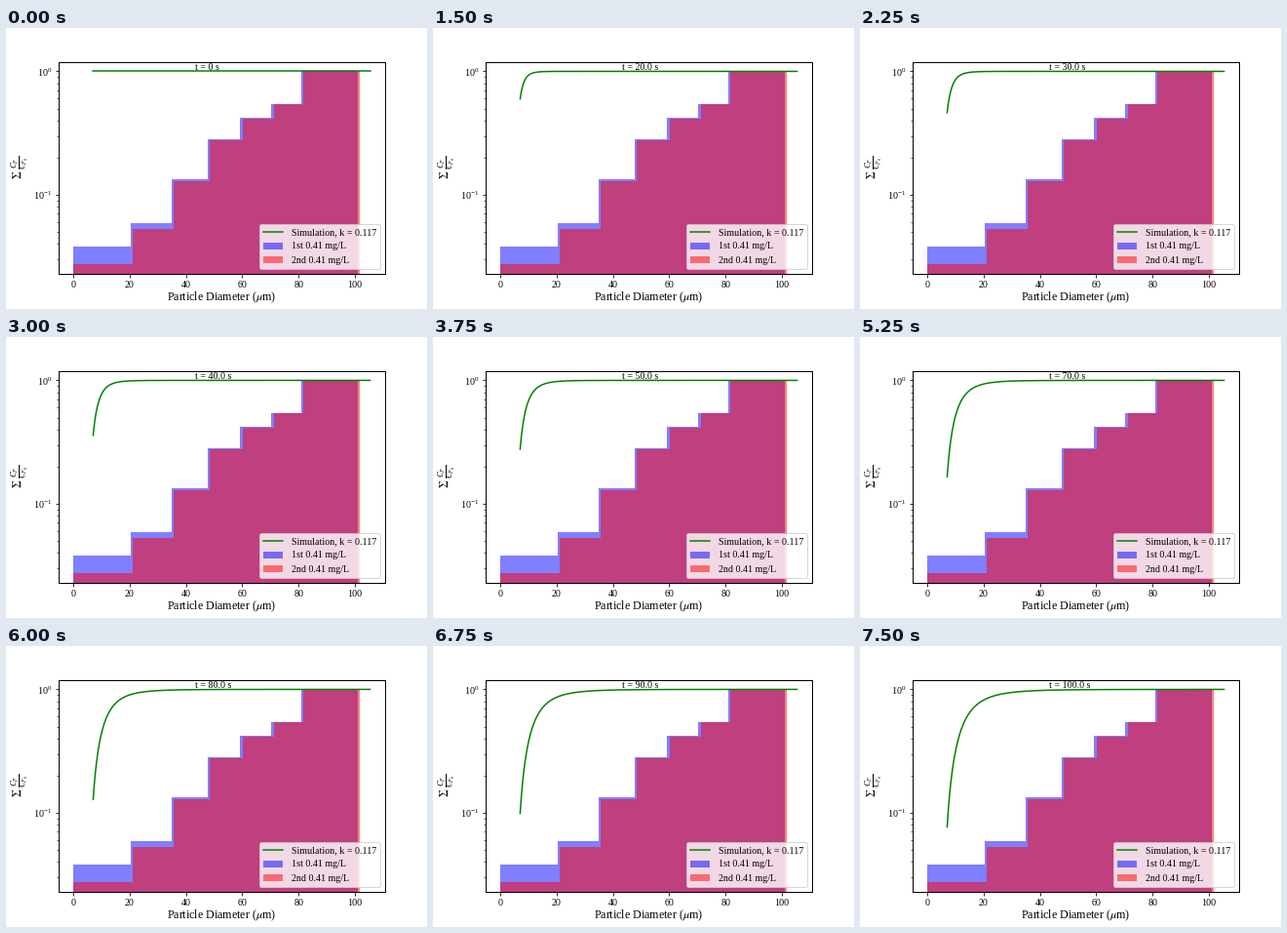
Animation, 432 px wide and 288 px high, one loop 8 s. Source, as a matplotlib script:

```python
from math import gamma

import numpy as np
import matplotlib.pyplot as plt
from matplotlib.animation import FuncAnimation

plt.rcParams.update({
    "font.family": "Liberation Serif",
    "mathtext.fontset": "stix",
    "font.size": 10,
    "axes.labelsize": 12,
    "axes.linewidth": 1,
})

TICK_MS = 250
LOOP_MS = 8000
STEP_MS = 750        # one simulated step of 10 s
RATE = 0.0257        # collisions per second
CLAY = 7             # primary particle diameter, um
FRACTAL_DIM = 2.3
DOUBLINGS = 9

fig = plt.figure(figsize=(6, 4), dpi=72)
fig.subplots_adjust(left=0.125, right=0.9, bottom=0.125, top=0.88)
ax = fig.add_subplot()


def histogram(scale, power, heights, color, label):
    channel = np.append(np.arange(7), 8.03)
    edges = scale * channel ** power
    return ax.bar(edges[:-1], heights, np.diff(edges), align="edge",
                  color=color, alpha=0.5, label=label)


def share_below(doublings, hits):
    """Poisson chance of at most `doublings` collisions, for real counts."""
    s = doublings + 1
    tail = sum(hits ** k / GAMMA[k] for k in range(len(GAMMA)))
    return 1 - hits ** s * np.exp(-hits) * tail


first = np.array([0.038, 0.0588, 0.1334, 0.2816, 0.418, 0.5426, 1])
second = first - 0.0111 * (1 - first) * np.arange(1, 8) ** -0.7
bars1 = histogram(20.5, 0.7664, first, "blue", "1st 0.41 mg/L")
bars2 = histogram(21.01, 0.758, second, "red", "2nd 0.41 mg/L")

doublings = np.linspace(0, DOUBLINGS, 400)
size = CLAY * 2 ** (doublings / FRACTAL_DIM)
GAMMA = [np.array([gamma(d + k + 2) for d in doublings]) for k in range(25)]
curve, = ax.plot(size, np.ones_like(size), "g", lw=1.5,
                 label="Simulation, k = 0.117")
clock = fig.text(0.45, 0.85, "")

ax.set_yscale("log")
margin = 0.05 * size[-1]
ax.set_xlim(-margin, size[-1] + margin)
pad = second[0] ** 0.05
ax.set_ylim(second[0] * pad, 1 / pad)
ax.set_xlabel(r"Particle Diameter ($\mu$m)", labelpad=1)
ax.set_ylabel(r"$\Sigma\ \frac{C_P}{C_{P_0}}$", labelpad=2)
ax.legend(handles=[curve, bars1, bars2], loc="lower right",
          handletextpad=0.85, labelspacing=0.55)


def update(frame):
    t = 10.0 * (frame * TICK_MS // STEP_MS)
    curve.set_ydata(share_below(doublings, RATE * t))
    clock.set_text(f"t = {t} s" if t else "t = 0 s")
    return curve, clock


anim = FuncAnimation(fig, update, frames=LOOP_MS // TICK_MS,
                     interval=TICK_MS, repeat=True)
plt.show()
```
